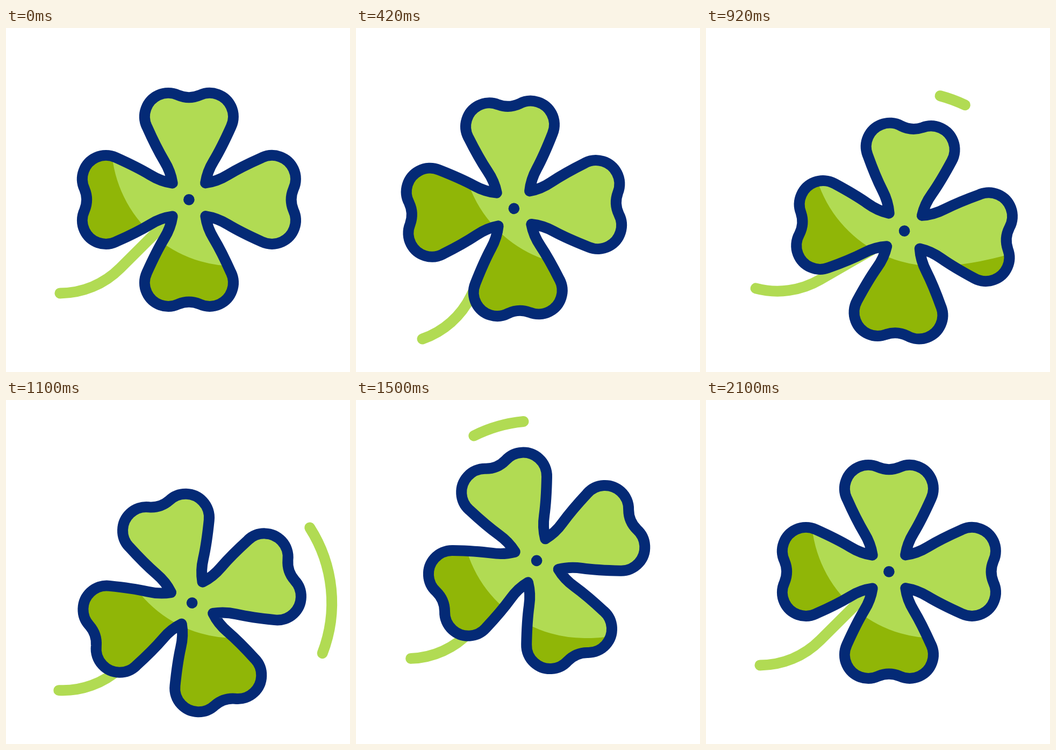
Recreate the animation shown at these times as an HTML page with a canvas. Size 640 px wide and 640 px high, loop 2.4 s.

```html
<!DOCTYPE html>
<html lang="en">
<head>
<meta charset="utf-8">
<title>Four-leaf clover</title>
<style>
html, body { margin: 0; height: 100%; overflow: hidden; background: #fff; }
canvas { display: block; width: 640px; height: 640px; }
</style>
</head>
<body>
<canvas width="640" height="640"></canvas>
<script>
const ctx = document.querySelector('canvas').getContext('2d');
const LIGHT = '#b1db53', DARK = '#90b607', NAVY = '#042a76';
const LOOP = 2400, RAD = Math.PI / 180;
const PIVOT = [236, 445], ARM = [104.4, -125.6];

// Keys are [ms, value]; every segment eases in and out.
const SWAY = [[0, 0], [415, -19], [858, 16.1], [1316, -8.5], [1680, 4.3], [2100, 0]];
const LIFT = [[0, 0], [340, 44], [410, 44], [650, -22], [710, -22], [1065, 55], [1440, -18], [1515, -17], [1730, 14], [2100, 0]];
const SPIN = [[0, 0], [115, 0], [600, 23.5], [893, -12.5], [1570, 349.4], [2100, 360]];
const HEAD = [[849, -90], [1541, 270]];
const TAIL = [[935, -90], [1609, 270]];

function at(keys, t) {
  let [t0, v0] = keys[0];
  for (const [t1, v1] of keys) {
    if (t < t1) {
      const u = Math.max(0, (t - t0) / (t1 - t0));
      return v0 + (v1 - v0) * u * u * (3 - 2 * u);
    }
    [t0, v0] = [t1, v1];
  }
  return v0;
}

function stroke(color) {
  ctx.strokeStyle = color;
  ctx.stroke();
}

function drawStem() {
  ctx.beginPath();
  ctx.arc(-240, 16, 158, Math.PI / 2, Math.PI / 4, true);
  ctx.lineTo(-20, 20);
  stroke(LIGHT);
}

function drawTrail(t) {
  const head = at(HEAD, t), tail = at(TAIL, t);
  if (head - tail < 0.1) return;
  ctx.beginPath();
  ctx.arc(0, 0, 260, tail * RAD, head * RAD);
  stroke(LIGHT);
}

// One outline of four petals; the transform turns a quarter after each.
function traceClover() {
  ctx.beginPath();
  ctx.moveTo(-30.7, -31);
  for (let i = 0; i < 4; i++) {
    ctx.bezierCurveTo(-33, -46, -38, -59, -46, -72);
    ctx.bezierCurveTo(-58, -92, -69, -115, -78.3, -136);
    ctx.arc(-38.5, -154.5, 44, 155 * RAD, 295 * RAD);
    ctx.bezierCurveTo(-7, -189, 7, -189, 19.9, -194.4);
    ctx.arc(38.5, -154.5, 44, 245 * RAD, 385 * RAD);
    ctx.bezierCurveTo(69, -115, 58, -92, 46, -72);
    ctx.bezierCurveTo(38, -59, 33, -46, 30.7, -31);
    ctx.rotate(Math.PI / 2);
  }
  ctx.closePath();
}

// The shadow edge stays fixed on the stage.
function fillShade() {
  ctx.save();
  ctx.clip();
  ctx.setTransform(1, 0, 0, 1, 0, 0);
  ctx.beginPath();
  ctx.moveTo(205, 0);
  ctx.ellipse(425, 213, 229, 230, 0, 196 * RAD, 90 * RAD, true);
  ctx.quadraticCurveTo(500, 443, 600, 410);
  ctx.lineTo(640, 640);
  ctx.lineTo(0, 640);
  ctx.lineTo(0, 0);
  ctx.fillStyle = DARK;
  ctx.fill();
  ctx.restore();
}

function draw(t) {
  const sway = at(SWAY, t) * RAD;
  ctx.setTransform(1, 0, 0, 1, 0, 0);
  ctx.clearRect(0, 0, 640, 640);
  ctx.lineWidth = 20;
  ctx.lineCap = ctx.lineJoin = 'round';

  ctx.translate(PIVOT[0], PIVOT[1] + at(LIFT, t));
  ctx.rotate(sway);
  ctx.translate(...ARM);
  drawTrail(t);
  drawStem();

  ctx.rotate(at(SPIN, t) * RAD);
  traceClover();
  ctx.fillStyle = LIGHT;
  ctx.fill();
  fillShade();
  traceClover();
  stroke(NAVY);

  ctx.beginPath();
  ctx.arc(0, 0, 10.3, 0, 2 * Math.PI);
  ctx.fillStyle = NAVY;
  ctx.fill();
}

const start = performance.now();
function frame() {
  draw((performance.now() - start) % LOOP);
  requestAnimationFrame(frame);
}
frame();
</script>
</body>
</html>
```
